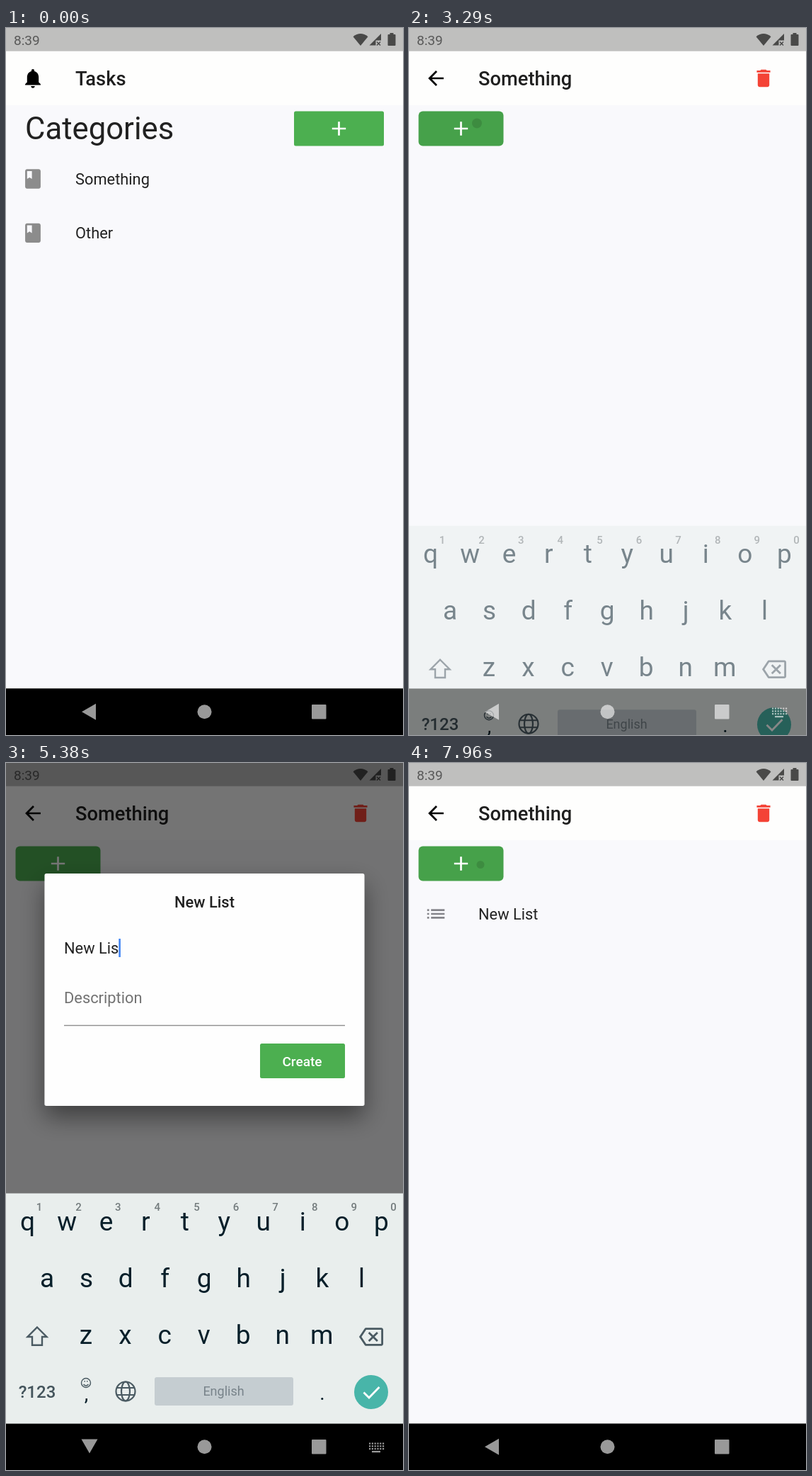
Recreate the animation shown at these times as an HTML page. Size 561x998 px, loop 8 s.

```html
<!DOCTYPE html>
<html lang="en">
<head>
<meta charset="utf-8">
<title>Tasks</title>
<style>
html, body { margin: 0; width: 100%; height: 100%; overflow: hidden; background: #000; }
svg { display: block; width: 100%; height: 100%; font-family: Roboto, sans-serif; }
text { white-space: pre; }
.body { font-size: 21.84px; fill: #212121; }
.title { font-size: 27.3px; font-weight: 500; fill: #1f1f1f; }
.hint { font-size: 21.84px; fill: #737373; }
.plus { stroke: #fff; stroke-width: 2.7; }
.line { fill: none; stroke: #4a5a62; stroke-width: 2.4; }
</style>
</head>
<body>
<svg id="stage" viewBox="0 0 561 998">
  <defs>
    <clipPath id="screen"><rect width="561" height="932.6"/></clipPath>
    <clipPath id="addClip"><rect x="13.5" y="117.5" width="120" height="49" rx="6"/></clipPath>
    <clipPath id="createClip"><rect x="359" y="396" width="120" height="49" rx="2.5"/></clipPath>
    <filter id="shadow" x="-20%" y="-20%" width="140%" height="150%">
      <feDropShadow dx="0" dy="16" stdDeviation="17" flood-color="#000" flood-opacity=".45"/>
    </filter>
  </defs>
  <g clip-path="url(#screen)">
    <g id="home"></g>
    <g id="detail"></g>
    <rect id="barrier" width="561" height="933"/>
    <g id="dialog"></g>
  </g>
  <g id="status"></g>
  <g id="keyboard"></g>
  <g id="nav" fill="#fff" fill-opacity=".6"></g>
</svg>
<script>
const LOOP = 8000;
const $ = id => document.getElementById(id);

// 24-unit icon shapes
const ICON = {
  bell: 'M12 22c1.1 0 2-.9 2-2h-4c0 1.1.89 2 2 2zm6-6v-5c0-3.07-1.64-5.64-4.5-6.32V4c0-.83-.67-1.5-1.5-1.5s-1.5.67-1.5 1.5v.68C7.63 5.36 6 7.92 6 11v5l-2 2v1h16v-1l-2-2z',
  book: 'M18 2H6c-1.1 0-2 .9-2 2v16c0 1.1.9 2 2 2h12c1.1 0 2-.9 2-2V4c0-1.1-.9-2-2-2zM6 4h5v8l-2.5-1.5L6 12V4z',
  back: 'M20 11H7.83l5.59-5.59L12 4l-8 8 8 8 1.41-1.41L7.83 13H20v-2z',
  trash: 'M6 19c0 1.1.9 2 2 2h8c1.1 0 2-.9 2-2V7H6v12zM19 4h-3.5l-1-1h-5l-1 1H5v2h14V4z',
  list: 'M3 13h2v-2H3v2zm0 4h2v-2H3v2zm0-8h2V7H3v2zm4 4h14v-2H7v2zm0 4h14v-2H7v2zM7 7v2h14V7H7z',
  erase: 'M22 3H7c-.69 0-1.23.35-1.59.88L0 12l5.41 8.11c.36.53.9.89 1.59.89h15c1.1 0 2-.9 2-2V5c0-1.1-.9-2-2-2zm0 16H7.07L2.4 12l4.66-7H22v14zm-11.59-2L14 13.41 17.59 17 19 15.59 15.41 12 19 8.41 17.59 7 14 10.59 10.41 7 9 8.41 12.59 12 9 15.59z'
};

const icon = (name, x, y, fill, size = 1.365) =>
  `<path d="${ICON[name]}" fill="${fill}" transform="translate(${x} ${y}) scale(${size}) translate(-12 -12)"/>`;
const text = (str, x, y, attrs) => `<text x="${x}" y="${y}" ${attrs}>${str}</text>`;
const rect = (x, y, w, h, fill, rx = 0, more = '') =>
  `<rect x="${x}" y="${y}" width="${w}" height="${h}" fill="${fill}" rx="${rx}" ${more}/>`;
const plus = (x, y) => `<path class="plus" d="M${x - 9.7} ${y}h19.4M${x} ${y - 9.7}v19.4"/>`;
const page = () => rect(0, 0, 561, 934, '#f9f9fc') + rect(0, 0, 561, 109, '#fefefd');

$('home').innerHTML = page() +
  icon('bell', 38, 71, '#000') + text('Tasks', 98, 81, 'class="title"') +
  text('Categories', 27, 157.3, 'font-size="43.7" fill="#212121"') +
  rect(407, 117.5, 127, 49, '#4caf50', 2.5) + plus(470.5, 142) +
  rect(0, 175, 561, 76, '#bcbcbc', 0, 'id="row" opacity="0"') +
  ['Something', 'Other'].map((name, i) =>
    icon('book', 38, 213 + i * 76.4, '#8c8c8c') +
    text(name, 98, 220.5 + i * 76.4, 'class="body"')).join('');

$('detail').innerHTML = page() +
  icon('back', 38, 71, '#000') + text('Something', 98, 81, 'class="title"') +
  icon('trash', 501, 71, '#f44336') +
  rect(13.5, 117.5, 120, 49, '#4caf50', 6) +
  `<g clip-path="url(#addClip)">${rect(13, 117, 121, 50, '#000', 0, 'id="addShade"')}
   <circle id="addDot"/></g>` +
  plus(73.5, 142) +
  `<g id="item">${icon('list', 38, 213, '#85858a')}${text('New List', 98, 220.5, 'class="body"')}</g>`;

$('dialog').innerHTML =
  rect(54.5, 156, 452, 328, '#fefefe', 2.7, 'filter="url(#shadow)"') +
  text('New List', 280.5, 204.3, 'class="body" font-weight="500" text-anchor="middle"') +
  text('Name', 82, 268.5, 'class="hint" id="nameHint"') +
  text('', 82, 268.5, 'class="body" id="field"') +
  rect(0, 248, 2.6, 26, '#4285f4', 0, 'id="cursor"') +
  text('Description', 82, 338.5, 'class="hint"') +
  rect(82, 369.8, 397, 1.4, '#8e8e8e') +
  rect(359, 396, 120, 49, '#4caf50', 2.5) +
  `<g clip-path="url(#createClip)">${rect(359, 396, 120, 49, '#000', 0, 'id="createShade"')}</g>` +
  text('Create', 418.5, 427.6, 'font-size="19.1" font-weight="500" fill="#fff" text-anchor="middle"');

$('status').innerHTML = rect(0, 0, 561, 32.7, '#000', 0, 'opacity=".25"') +
  `<g opacity=".62">${text('8:39', 11, 23.6, 'font-size="19.1" opacity=".87"')}
  <path d="M490.5 12.2Q501 4 511.500 12.2L501 25Z"/>
  <path d="M530 8V17.5H522.500V24.500H513.500Z"/>
  <path d="M524 19.500l5 5m0-5l-5 5" stroke="#000" stroke-width="1.5"/>
  <path d="M542.500 7h5v2h2q1 0 1 1v14q0 1-1 1h-9q-1 0-1-1v-14q0-1 1-1h2z"/></g>`;

function keyRow(keys, x0, y) {
  return [...keys].map((k, i) =>
    text(k, x0 + i * 55.55, y, 'font-size="37" fill="#071f2a" text-anchor="middle"')).join('');
}
$('keyboard').innerHTML =
  rect(0, 607.5, 561, 326, '#e9eeed') + rect(0, 932.6, 561, 66, '#000') +
  keyRow('qwertyuiop', 30.5, 659.5) + keyRow('asdfghjkl', 58, 739.5) + keyRow('zxcvbnm', 113, 820) +
  [...'1234567890'].map((d, i) =>
    text(d, 47 + i * 55.6, 632.3, 'font-size="15" font-weight="500" fill="#737b7d" text-anchor="middle"')).join('') +
  '<path class="line" d="M44 796.500L57.500 810H51V821.800H37V810H30.500Z"/>' +
  icon('erase', 516, 810, '#4a5a62', 1.42) +
  text('?123', 44, 895.5, 'font-size="24" font-weight="500" fill="#44545c" text-anchor="middle"') +
  `<g class="line" style="stroke-width:1.4"><circle cx="113" cy="875" r="6.500"/>
   <path d="M109.500 877q3.500 4 7 0M110.500 872.800h1.500M114 872.800h1.500"/></g>` +
  text(',', 113.5, 900, 'font-size="28" fill="#071f2a" text-anchor="middle"') +
  `<g class="line" style="stroke-width:2.200"><circle cx="169" cy="887" r="13.500"/>
   <ellipse cx="169" cy="887" rx="6" ry="13.500"/><path d="M156.500 882h25M156.500 892h25"/></g>` +
  rect(210, 867, 196, 40, '#c5cdd1', 3) +
  text('English', 307.5, 893.3, 'font-size="18" fill="#78838a" text-anchor="middle"') +
  text('.', 447, 899, 'font-size="28" fill="#071f2a" text-anchor="middle"') +
  `<circle cx="516" cy="888" r="24" fill="#48b5a9"/>
   <path d="M505.500 888.500l7.500 7.500 14.500-15" fill="none" stroke="#fff" stroke-width="2.800"/>`;

let dots = '';
for (let r = 0; r < 3; r++)
  for (let c = 0; c < 6; c++) dots += `M${513 + c * 3.8} ${959.5 + r * 3.8}h2.2v2.2h-2.2z`;
$('nav').innerHTML =
  `<path id="backKey" d="M-11 0L9-11.500V11.500Z"/><circle cx="280.500" cy="965.300" r="10"/>
   <rect x="432" y="955" width="20.500" height="20.500" rx="1"/>
   <path id="hideKey" d="${dots}M517 971h12v2.200h-12z"/>`;
$('nav').insertAdjacentHTML('beforebegin', '');
$('keyboard').insertAdjacentHTML('beforebegin', rect(0, 932.6, 561, 66, '#000'));

const ramp = (t, start, length) => Math.min(1, Math.max(0, (t - start) / length));
const easeOut = p => 1 - (1 - p) ** 3;

function bezier(x1, y1, x2, y2) {
  const at = (a, b, s) => 3 * (1 - s) ** 2 * s * a + 3 * (1 - s) * s * s * b + s ** 3;
  return p => {
    let lo = 0, hi = 1;
    for (let i = 0; i < 24; i++) {
      const mid = (lo + hi) / 2;
      if (at(x1, x2, mid) < p) lo = mid; else hi = mid;
    }
    return at(y1, y2, hi);
  };
}
const slideEase = bezier(.4, 0, .2, 1);
const fadeEase = bezier(.42, 0, 1, 1);

const set = (id, attrs) => {
  for (const k in attrs) $(id).setAttribute(k, attrs[k]);
};
const show = (id, on) => set(id, { display: on ? 'inline' : 'none' });

const KEY_TIMES = [4300, 4480, 4640, 4820, 5020, 5160, 5320, 5470];

function drawPages(t) {
  set('row', { opacity: .4 * ramp(t, 1150, 100) * (1 - ramp(t, 1350, 150)) });
  const p = ramp(t, 1325, 300);
  show('detail', p > 0);
  set('detail', {
    opacity: fadeEase(p),
    transform: `translate(0 ${233 * (1 - slideEase(p))})`
  });
  show('item', t >= 6680);
}

function drawPress(t) {
  const again = t > 7000;
  const start = again ? 7750 : 2830;
  const fade = again ? 1 : 1 - ramp(t, 3340, 230);
  const grow = again ? 0 : easeOut(ramp(t, 3320, 250));
  const on = ramp(t, start, 180);
  set('addShade', { opacity: .08 * on * fade });
  set('addDot', {
    cx: again ? 101 : 96, cy: again ? 143.500 : 134.500,
    r: (again ? 5.5 : 7) * on + 110 * grow, opacity: .13 * on * fade
  });
  set('createShade', { opacity: .1 * ramp(t, 6500, 120) * (1 - ramp(t, 6700, 120)) });
}

function drawDialog(t) {
  const seen = easeOut(ramp(t, 3360, 160)) * (1 - ramp(t, 6690, 150));
  const lift = slideEase(ramp(t, 3410, 150));
  set('barrier', { opacity: .54 * seen });
  show('dialog', seen > 0);
  set('dialog', { opacity: seen, transform: `translate(0 ${163 * (1 - lift)})` });

  const typed = KEY_TIMES.filter(k => t >= k);
  const field = $('field');
  field.textContent = 'New List'.slice(0, typed.length);
  show('nameHint', !typed.length);
  const since = t - (typed.length ? typed[typed.length - 1] : 3330);
  show('cursor', since % 1000 < 500);
  set('cursor', { x: 82 + (typed.length ? field.getComputedTextLength() : 0) });
}

function drawKeyboard(t) {
  const rise = ramp(t, 3180, 210);
  const fall = ramp(t, 6830, 220);
  show('keyboard', t >= 3285 && fall < 1);
  set('keyboard', {
    opacity: rise * (1 - fall),
    transform: `translate(0 ${202 * (1 - rise) + 240 * fall * fall})`
  });
  const down = ramp(t, 3290, 200) - ramp(t, 6850, 200);
  set('backKey', { transform: `translate(118 ${965.3 - 1.8 * down}) rotate(${-90 * down})` });
  show('hideKey', t >= 3285 && t < 6840);
}

function draw() {
  const t = performance.now() % LOOP;
  drawPages(t);
  drawPress(t);
  drawDialog(t);
  drawKeyboard(t);
  requestAnimationFrame(draw);
}
draw();
</script>
</body>
</html>
```
